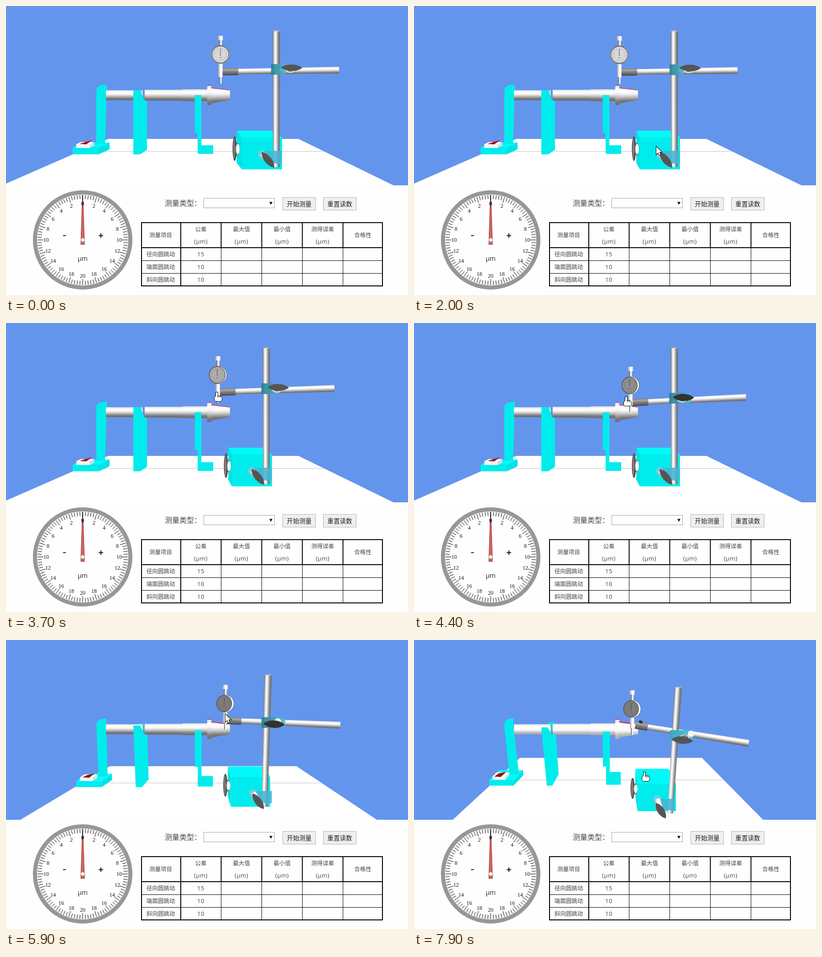
These frames come from a looping animation (881 by 635 pixels, 8 s). An HTML page with a canvas:

```html
<!DOCTYPE html>
<html lang="zh">
<head>
<meta charset="utf-8">
<title>圆跳动测量</title>
<style>
html, body { margin: 0; width: 100%; height: 100%; overflow: hidden; background: #fefefe; }
canvas, svg { position: absolute; left: 0; top: 0; display: block; }
text { font-family: "Open Sans", "Noto Sans CJK SC", "Noto Sans CJK", sans-serif; fill: #444; text-anchor: middle; dominant-baseline: central; }
.cell { font-size: 12.5px; }
.num { font-size: 13px; letter-spacing: .5px; }
.scale { font: 12px "Liberation Serif", serif; fill: #111; }
.unit { font-size: 14px; fill: #222; }
.btn { font-size: 13.6px; fill: #222; }
.name { font-size: 16px; }
</style>
</head>
<body>
<canvas id="scene" width="881" height="395"></canvas>
<svg id="panel" width="881" height="635"></svg>
<script>
const panel = document.getElementById('panel');
const c = document.getElementById('scene').getContext('2d');
const LOOP = 8000, STEP = 100;

// ---- static panel: gauge, form, table ----
function el(name, attrs, text) {
  const e = document.createElementNS('http://www.w3.org/2000/svg', name);
  for (const k in attrs) e.setAttribute(k, attrs[k]);
  if (text) e.textContent = text;
  panel.append(e);
}
const label = (x, y, s, cls) => el('text', { x, y, class: cls }, s);
const rule = (x1, y1, x2, y2, w = 1) =>
  el('line', { x1, y1, x2, y2, stroke: 'black', 'stroke-width': w });
const frame = (x, y, width, height, fill, stroke, w = 1) =>
  el('rect', { x, y, width, height, fill, stroke, 'stroke-width': w });

function gauge(cx, cy) {
  el('circle', { cx, cy, r: 104.5, fill: '#fefefe', stroke: '#979797', 'stroke-width': 9 });
  for (let i = 0; i < 100; i++) {
    const a = i * Math.PI / 50, x = Math.sin(a), y = -Math.cos(a), r = i % 5 ? 90 : 86;
    rule(cx + 99 * x, cy + 99 * y, cx + r * x, cy + r * y);
  }
  for (let n = 2; n <= 20; n += 2) {
    const a = n * Math.PI / 20, x = 80 * Math.sin(a), y = cy - 79 * Math.cos(a);
    label(cx + x, y, n, 'scale');
    if (n < 20) label(cx - x, y, n, 'scale');
  }
  const row = cy - 9.5;
  rule(cx - 43, row, cx - 37, row, 1.8);
  rule(cx + 35, row, cx + 45, row, 1.8);
  rule(cx + 40, row - 5, cx + 40, row + 5, 1.8);
  label(cx, cy + 40, 'μm', 'unit');
  rule(cx, cy - 99, cx, cy - 75, 1.5);
  el('path', { d: `M${cx - 1} ${cy - 84}h2l3 94h-8z`, fill: '#cd6767', stroke: 'brown' });
  el('ellipse', { cx, cy: cy - 80, rx: 2.8, ry: 4.5, fill: '#333' });
  el('circle', { cx, cy, r: 4.3, fill: 'white', stroke: 'gray' });
}

function form() {
  label(388, 433, '测量类型：', 'name');
  frame(433.5, 422.5, 155, 21, 'white', '#a0a0a0');
  el('path', { d: 'M577 430.5h7l-3.5 6z' });
  ['开始测量', '重置读数'].forEach((s, i) => {
    const x = 606.5 + i * 89;
    frame(x, 420.5, 72, 28, '#efefef', '#b4b4b4');
    label(x + 36, 434, s, 'btn');
  });
}

function table() {
  const left = 297, right = 825, top = 476, head = 531, end = 615;
  frame(left, top, right - left, end - top, 'none', 'black', 2);
  rule(383, top, 383, end, 2);
  ['公差', '最大值', '最小值', '测得误差'].forEach((s, i) => {
    const x = 471.5 + i * 89;
    rule(x, top, x, head, 2);
    rule(x, head, x, end);
    label(x - 44.5, 490.5, s, 'cell');
    label(x - 44.5, 517, '(μm)', 'num');
  });
  label(339, 503, '测量项目', 'cell');
  label(782, 503, '合格性', 'cell');
  ['径向圆跳动', '端面圆跳动', '斜向圆跳动'].forEach((s, i) => {
    const y = head + i * 28 + .5;
    rule(left, y - .5 * !i, right, y - .5 * !i, i ? 1 : 2);
    label(339, y + 13.8, s, 'cell');
    label(427, y + 13.8, i ? '10' : '15', 'num');
  });
}
gauge(168, 514);
form();
table();

// ---- scene helpers ----
const mix = (a, b, u) => a.map((v, i) => v + (b[i] - v) * u);

function track(keys, t) {
  let i = keys.length - 1;
  while (i > 0 && keys[i][0] > t) i--;
  const a = keys[i], b = keys[i + 1];
  return (b ? mix(a, b, (t - a[0]) / (b[0] - a[0])) : a).slice(1);
}

function poly(fill, ...p) {
  c.beginPath();
  for (let i = 0; i < p.length; i += 2) c.lineTo(p[i], p[i + 1]);
  c.closePath();
  c.fillStyle = fill;
  c.fill();
}

function rect(fill, x, y, w, h) {
  c.fillStyle = fill;
  c.fillRect(x, y, w, h);
}

function oval(fill, x, y, rx, ry, rot = 0) {
  c.beginPath();
  c.ellipse(x, y, rx, ry, rot, 0, 7);
  c.fillStyle = fill;
  c.fill();
}

function line(color, w, x1, y1, x2, y2) {
  c.beginPath();
  c.moveTo(x1, y1);
  c.lineTo(x2, y2);
  c.strokeStyle = color;
  c.lineWidth = w;
  c.stroke();
}

const METAL = ['gainsboro', 'white', 'whitesmoke', 'silver', 'gray', 'dimgray'];
const ROD = ['dimgray', 'gainsboro', 'white', 'silver', 'gray', 'dimgray'];
const PALE = ['gainsboro', 'white', 'white', 'whitesmoke', 'silver', 'darkgray'];
const DARK = ['gray', 'darkgray', 'gray', 'dimgray', '#444'];
const CYAN = '#00ecec', LIGHT = '#00fafa', SHADE = '#00e2e4';

// Shaded rod between two points, radius r1 to r2
function tube(x1, y1, x2, y2, r1, r2 = r1, tones = METAL) {
  const d = Math.hypot(x2 - x1, y2 - y1), nx = (y1 - y2) / d, ny = (x2 - x1) / d;
  const r = Math.max(r1, r2), mx = (x1 + x2) / 2, my = (y1 + y2) / 2;
  const g = c.createLinearGradient(mx - nx * r, my - ny * r, mx + nx * r, my + ny * r);
  tones.forEach((s, i) => g.addColorStop(i / (tones.length - 1), s));
  poly(g, x1 - nx * r1, y1 - ny * r1, x2 - nx * r2, y2 - ny * r2,
    x2 + nx * r2, y2 + ny * r2, x1 + nx * r1, y1 + ny * r1);
}

// Box: front face, offset to the back face, width of the back face
function box([x, y, w, h, dx, dy, bw], front = CYAN, top = LIGHT, side = SHADE) {
  const r = x + w, b = y + h, bx = x + dx, by = y + dy, br = bx + bw;
  poly(side, x, y, bx, by, bx, b + dy, x, b);
  poly(side, r, y, br, by, br, b + dy, r, b);
  poly(front, x, y, r, y, r, b, x, b);
  poly(top, x, y, bx, by, br, by, r, y);
}

function wing(x, y, rx, ry, rot, fill) {
  c.save();
  c.translate(x, y);
  c.rotate(rot);
  c.beginPath();
  c.moveTo(-rx, 0);
  for (const d of [1, -1])
    c.bezierCurveTo(-d * rx / 2, -d * ry * 1.35, d * rx / 2, -d * ry * 1.35, d * rx, 0);
  c.fillStyle = fill;
  c.fill();
  c.restore();
}

// ---- motion ----
const SLIDE = [[1200, 0], [1300, .05], [1600, 1]];
const TURN = [[2800, 0], [2900, .1], [3700, .47], [4400, .81], [4600, .85], [4900, 1]];
const DROP = [[1200, 0], [2900, 1.5], [3700, 7.5], [4200, 33.5], [4400, 30.5], [4600, 29.5], [4900, 24.5]];
const CAMERA = [[5500, 0], [6400, 1]];
const NUDGE = [[7000, 0], [7400, 1]];
const POINTER = [
  [300, 866, 112], [1100, 556, 310], [1300, 552, 309], [1600, 531, 309], [2000, 531, 309],
  [2800, 559, 142], [2900, 559, 142], [3700, 462, 152], [4400, 465, 162], [4900, 461, 150],
  [5100, 463, 150], [5300, 475, 155], [5500, 475, 155], [6400, 488, 173], [7000, 489, 175],
  [7400, 484, 180], [7900, 505, 290]
];
const at = (keys, t) => track(keys, Math.max(t, keys[0][0]))[0];

function room(k) {
  rect('#6495ed', 0, 0, 881, 395);
  const [l, r, y, fl, fr] = mix([224, 641, 292, -11, 851], [232, 631, 259, 85, 765], k);
  poly('white', l, y, r, y, fr, 395, fl, 395);
  if (k === 0) rect('white', 849, 394, 32, 1);
  const [a, b, ly] = mix([162, 695, 319.5], [183, 678, 307.5], k);
  line('silver', 1, a, ly, b, ly);
}

function upright(k) {
  const [x, y, tx, ty, rx, b, lx] = mix([198, 186, 221, 173, 217, 303, 198], [198, 190, 218, 172, 230, 295, 209], k);
  c.beginPath();
  c.moveTo(x, y);
  c.quadraticCurveTo(x, ty, tx, ty);
  c.lineTo(tx, y);
  c.lineTo(rx, b);
  c.lineTo(lx, b);
  c.fillStyle = CYAN;
  c.fill();
}

function spindle(k) {
  const tones = k > .5 ? PALE : METAL, y = 196;
  box(mix([146, 311, 57, 15, 24, -11, 57], [165, 308, 53, 12, 21, -22, 53], k));
  upright(k);
  box(mix([154, 304, 29, 8, 10, -5, 29], [172, 300, 28, 7, 9, -9, 28], k), 'whitesmoke', 'white', 'gainsboro');
  poly('#a80808', ...mix([161, 303, 174, 299, 188, 295, 176, 304], [176, 300, 186, 293, 202, 290, 190, 301], k));
  rect(SHADE, 294, 186 - 6 * k, 6 + 7 * k, 20);
  tube(219, y, 300, y, 11, 11, tones);
  tube(304, y, 387, y, 12, 12, tones);
  tube(387, y, 442, y, 13, 13, tones);
  line('gray', 1, 299, 186, 304, 207);
  poly(CYAN, ...mix([279, 185, 296, 185, 302, 207, 309, 208, 309, 316, 294, 326, 279, 326],
    [279, 192, 293, 192, 301, 207, 311, 208, 317, 295, 303, 320, 291, 320], k));
  rect(CYAN, 414, 196 + 5 * k, 14 + k, 83 - 6 * k);
  rect(CYAN, 420 + k, 196 + 5 * k, 8, 129 - 12 * k);
  rect(CYAN, 420 + k, 306 - 16 * k, 34 - 2 * k, 19 + 9 * k);
  tube(450, 197, 491, y, 17, 11, tones);
  tube(441, y, 450, y, 21.5, 21.5, tones);
  line('crimson', 1.2, 441, 174.5, 450, 174.5);
  line('crimson', 1 + k, 450, 180, 490 - 12 * k, 185 - k);
}

function base(s, k) {
  box(mix([517 - 22 * s, 289, 88, 70, 4 * s - 12, -15, 76], [490, 316, 84, 60, -5, -33, 73], k));
  const [x, y, ry] = mix([501 - 19 * s, 313.5, 27], [479, 326, 23], k);
  oval('#494949', x, y, 4.5, ry);
  oval('gray', x - 1, y, 2, ry - 3);
  oval('dimgray', x + 6, y + 1, 5, ry / 2);
  oval('whitesmoke', x + 7, y + 1, 4, ry / 2 - 2);
}

function lowerClamp(s, k) {
  const dx = 22 * s * (1 - k);
  const [x, y, w, h, lean] = mix([566 - dx, 318, 38, 28, 8], [530, 349, 41, 25, 11], k);
  poly('rgba(72,182,212,.88)', x, y, x + w, y, x + w, y + h, x + lean, y + h);
  const [kx, ky, wx, wy, a] = mix([560 - dx, 325, 574 - dx, 338, .9], [533, 349, 541, 375, 1], k);
  oval('#6cd0e6', kx, ky, 8, 8);
  tube(kx, ky, wx - 3, wy - 3, 6, 8, PALE);
  wing(wx, wy, 22 - 2 * k, 7.5, a, '#555');
}

function dial(x, y, turn) {
  const tip = 64 - 7 * turn, face = x - 2.3 * turn, g = 216 - 91 * turn;
  tube(x, y - 41, x, y - 31, 5.5, 5.5, PALE);
  tube(x, y - 32, x, y - 18, 3.2);
  tube(x, y + 18, x, y + tip - 14, 4.8, 4.8, PALE);
  tube(x, y + tip - 15, x, y + tip, 2.6);
  oval('dimgray', x, y, 20.5 - turn, 20.5 - turn);
  oval('whitesmoke', x, y, 19.7 - turn, 19.7 - turn);
  oval('#505050', face, y, 19 - 2 * turn, 19.5 - turn);
  oval(`rgb(${g},${g},${g})`, face, y, 17.7 - 2 * turn, 18 - turn);
  for (let i = 0; i < 20; i++) {
    const a = i * Math.PI / 10, px = Math.sin(a), py = Math.cos(a), r = 14 - 2 * turn;
    line('#444', .7, face + px * r, y + py * 14, face + px * (r - 1.5), y + py * 12.5);
  }
  line('#444', 1, face, y - 12, face, y + 3);
  line('#555', .8, face - 3, y + 7, face + 3, y + 7);
}

function stand(t, s, k) {
  const turn = at(TURN, t), nudge = at(NUDGE, t);
  const dx = 470 - 20 * s + 30 * turn + k, dy = 106.5 + at(DROP, t) + 19.5 * k;
  const cx = 581 - 21 * s - turn + 2 * k, cy = dy + 33 - 5.5 * turn + 32 * k;
  const wx = cx + 45 - 17 * turn - k, wy = cy - 4 + 2.5 * turn + 11.5 * k;
  const ex = 730 - 21 * s + 23 * turn + 1.5 * k, ey = cy + 1.5 - 4.5 * turn + 20 * k;

  // arm and sleeve
  const ax = dx + 4, ay = dy + 38 - 1.5 * k, len = 35 - 8 * k;
  const sx = ax + len, sy = ay + (ey - ay) * len / (ex - ax);
  tube(sx, sy, ex, ey, 6, 7.5);
  tube(ax, ay, sx, sy, 8, 8, DARK);

  // post
  const px = 592.5 - 22 * s;
  const [tx, ty, bx, by, br] = mix([px, 55, px, 354, 7.3], [579, 104, 561.5, 381, 6], k);
  tube(bx, by, tx, ty, br, 8, ROD);
  oval('silver', tx, ty, 8, 1.2);
  lowerClamp(s, k);

  // upper clamp
  const w = 33 + 19 * turn, g = c.createLinearGradient(cx, 0, cx + w, 0);
  g.addColorStop(0, k > .5 ? '#39a8c4' : 'rgba(38,126,146,.93)');
  g.addColorStop(1, 'rgba(82,190,216,.92)');
  c.beginPath();
  c.roundRect(cx, cy - 12, w, 23.5, [2, 9, 9, 2]);
  c.fillStyle = g;
  c.fill();
  oval('whitesmoke', wx + 19 * k, wy - 14 * k, 7, 7);
  oval('gainsboro', wx - 3 + 8 * k, wy + 4 - 9 * k, 11, 7.5);
  oval('gray', wx - 3 + 8 * k, wy + 3 - 8 * k, 8, 6);
  wing(wx, wy, 23.5, 7 + turn, .02 + .08 * k, turn > .5 && k < .5 ? '#333' : '#555');

  if (nudge > .5) oval('#333', 497, 180, 4.5, 3, .4);
  dial(dx - 3 * nudge, dy + nudge, turn);
}

function pointer(t) {
  if (t < 300) return;
  const [x, y] = track(POINTER, t);
  const hand = t >= 7000 || t >= 2800 && t < 5100 || t >= 1200 && t < 2000;
  c.save();
  c.translate(x, y);
  const p = new Path2D(hand ? '' : 'M0 0V17L4 13L7 19L9 18L7 12H12Z');
  if (hand) {
    p.roundRect(-2, 0, 4, 14, 2);
    p.roundRect(-5, 9, 16, 11, 4);
  }
  c.strokeStyle = 'black';
  c.lineWidth = 2;
  c.stroke(p);
  c.fillStyle = 'white';
  c.fill(p);
  if (hand) for (let i = 2; i < 9; i += 3) line('black', .8, i, 8, i, 12);
  c.restore();
}

function draw(t) {
  const s = at(SLIDE, t), k = at(CAMERA, t);
  room(k);
  spindle(k);
  base(s, k);
  stand(t, s, k);
  pointer(t);
}

const start = performance.now();
function tick() {
  const t = (performance.now() - start) % LOOP;
  draw(Math.floor(t / STEP) * STEP);
  requestAnimationFrame(tick);
}
tick();
</script>
</body>
</html>
```
